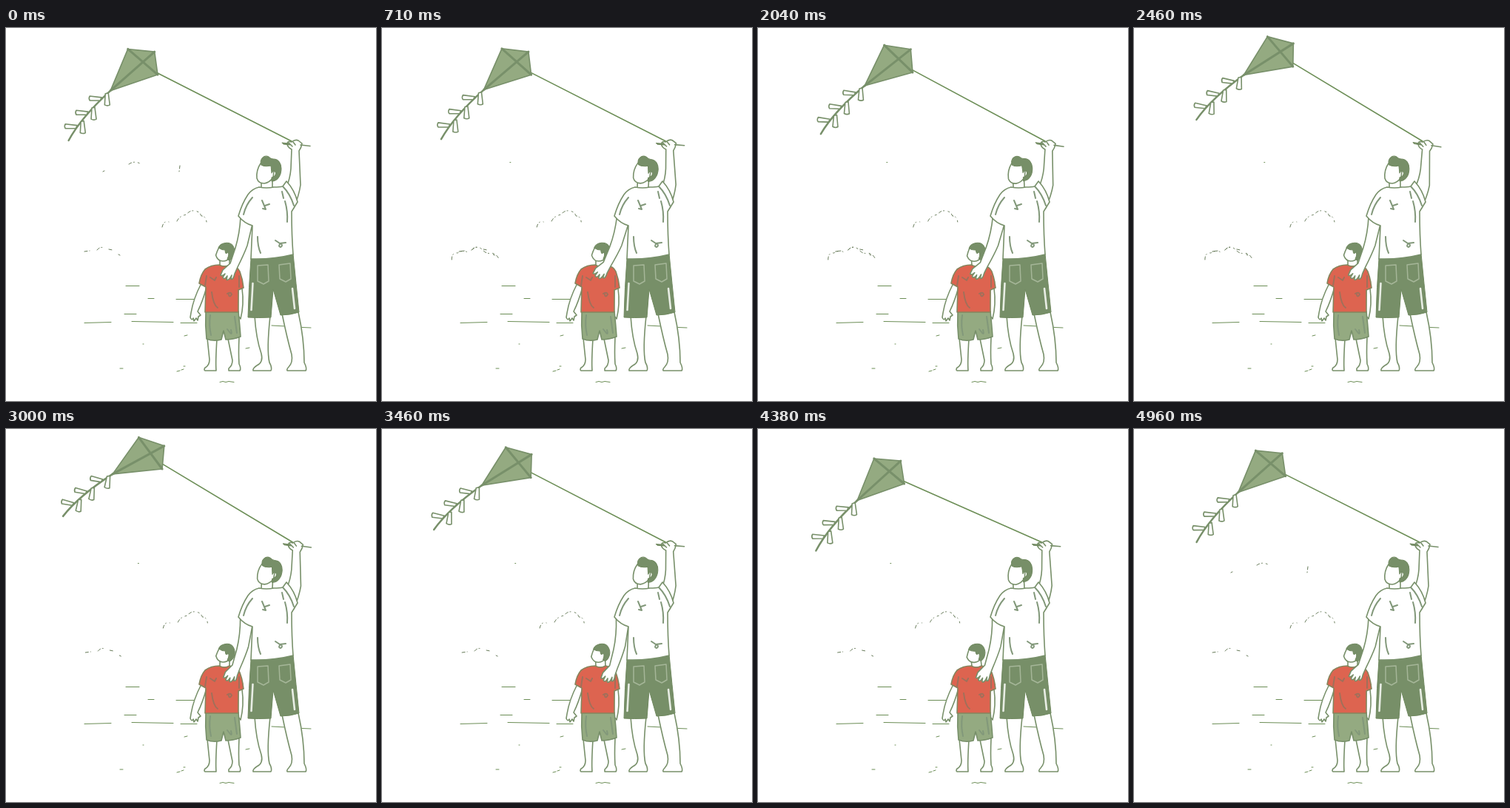
These frames come from a looping animation (500 by 504 pixels, 5000 ms). An HTML page:

```html
<!DOCTYPE html>
<html lang="en">
<head>
<meta charset="utf-8">
<title>Flying a kite</title>
<style>
  html, body { margin: 0; width: 100%; height: 100%; overflow: hidden; background: #fff; }
  svg { display: block; width: 100vw; height: 100vh; }
  path { stroke-linecap: round; stroke-linejoin: round; }
  .skin { fill: #fff; stroke: #78906a; stroke-width: 1.6; }
  .line { fill: none; stroke: #78906a; stroke-width: 1.6; }
  .fold { fill: none; stroke: #82987a; stroke-width: 2; }
  .dark { fill: #778f68; stroke: #70895f; stroke-width: 1; }
  .light { fill: #94aa81; stroke: #78906a; stroke-width: 1.6; }
  .red { fill: #dd6450; stroke: #86855d; stroke-width: 1.6; }
  .redFold { fill: none; stroke: #a0705a; stroke-width: 2; }
  .pocket { fill: none; stroke: #a5b698; stroke-width: 1.5; }
  .stripe { fill: none; stroke: #e8ede4; stroke-width: 2.6; }
  .thin { fill: none; stroke: #6b8d55; stroke-width: 1; }
  .faint { fill: none; stroke: #667a58; stroke-width: 1; stroke-dasharray: 4 3 1 5 2 4; }
</style>
</head>
<body>
<svg viewBox="0 0 500 504" preserveAspectRatio="none">
  <path class="faint" id="wisps" d="M131 194L133 193M166 184Q173 179 181 183M235 186L234 194"/>
  <path class="thin" id="speck" d="M172 181.5h1"/>
  <g id="clouds">
    <path class="faint" d="M211 269Q213 260 220 262M231 261Q234 254 244 252Q248 246 255 247Q262 248 264 254Q270 254 271 262"/>
    <path class="faint" d="M106 302L113 301M123 300Q127 295 132 297M139 299L144 300M152 306L154 307"/>
    <path class="faint" id="cloudEdge" d="M96 313Q96 303 104 304Q112 299 117 303M123 300Q130 292 138 300Q143 306 150 304Q158 306 160 313"/>
  </g>
  <path class="thin" d="M162 348.5H180M230 366.5H257M192 365.5H200M160 386.5H176M106 398.5L142 397.5M170 396.5L226 397.5M236 398.5H258M359 402L378 403M400 404.5L412 405"/>
  <path class="thin" d="M289 478.5l4 -1 4 1 4 -1 7 1M324 433l5 -1M154 460h4M185 427h1M231 464l4 -1M237 462l3 -1M240 457h2M241 416l4 -1"/>

  <path class="thin" id="string" style="stroke-width:1.5"/>
  <g id="kite">
    <g id="tail"><path class="line" style="stroke-width:2.5" d="M-64 21Q-104 57 -121 88"/></g>
    <path class="light" d="M-40 -35L-4 -31L0 0L-64 21Z"/>
    <path class="line" style="stroke-width:3" d="M-40 -35L0 0M-64 21L-4 -31"/>
  </g>

  <g id="raisedArm">
    <path class="skin" d="M379 215Q384 203 385 190L386 164Q380 161 380 156Q381 152 386 154Q391 150 395 152L400 156Q399 162 396 166L398 212Q396 226 389 243Z"/>
    <path class="dark" d="M373 155L382 156L384 158L375 157Z"/>
    <path class="line" d="M398 158L411 159.5M382 155L387 160M388 154L391 158"/>
  </g>

  <g id="child">
    <path class="skin" d="M264 345Q253 366 250 385L249 391Q251 396 253 392L254 396L257 392L259 395L260 390L263 388L259 383Q266 369 271 350ZM314 350L319 352Q322 373 317 393L313 388Z"/>
    <path class="skin" d="M272 419L275 448Q275 456 269 459Q267 462 269 463H284Q283 452 285 420ZM300 420L306 449Q306 456 301 460L301 463H316Q318 460 315 454Q314 440 315 418Z"/>
    <path class="light" d="M270 383H314Q316 402 317 417Q307 421 297 421L294 409L291 421Q280 424 271 420Q269 402 270 383Z"/>
    <path class="fold" d="M276 388Q274 402 277 415M309 390L312 412M299 407l4 5q3 3 1 -4"/>
    <g id="childHead">
      <path class="skin" d="M289 312V322H302V310Z"/>
      <path class="skin" d="M288 296Q285 302 283.5 307Q286 315 293 315Q299 315 303 310V296Z"/>
      <path class="dark" d="M287 297C290 289 303 288 307 295C311 302 308 311 302 314L299 312Q302 306 300 303Q296 307 296 300Q291 300 287 297Z"/>
    </g>
    <path class="red" d="M288 320Q295 324 302 320Q313 322 316 329Q320 340 321 351L314 354V384H269L270 350L261 345Q263 333 269 326Q277 320 288 320Z"/>
    <path class="redFold" d="M271 335L269 348M315 335V350M278 357Q280 374 286 378M276 337l6 4 2 -4M299 359q5 -3 6 1q-3 5 -4 0"/>
  </g>

  <path class="skin" d="M336 389Q338 420 345 440Q348 452 339 456Q333 460 334 463H358Q360 459 356 452Q352 435 357 389ZM373 386Q380 420 386 441Q388 452 382 458Q379 461 380 463H405Q407 460 403 452Q403 420 395 384Z"/>
  <path class="dark" d="M331 312Q360 312 388 305Q392 346 396 384Q384 388 371 388L361 353L358 391Q341 392 327 391Q328 350 331 312Z"/>
  <path class="pocket" d="M340 321L354 320L355 342L348 346L340 342ZM369 320L384 318L385 339L378 343L370 339Z"/>
  <path class="stripe" d="M333.5 345L331.5 381M387 352L390 379"/>

  <path class="skin" id="loweredArm" d="M317 255Q316 277 310 297L303 318L293 327L290 334Q292 336 296 332L293 337Q295 341 299 335L298 340Q301 342 305 334L304 339Q307 341 309 332L313 323Q322 305 326 294L333 265Z"/>
  <g id="fatherHead">
    <path class="skin" d="M345 203V218H360V202Z"/>
    <path class="skin" d="M344 183Q338 192 339 203Q341 210 349 210Q356 209 361 202L363 185Z"/>
    <path class="dark" d="M345 185C342 177 349 171 355 174Q358 177 361 177C369 177 372 184 372 190C372 199 367 207 359 207L359 202C366 200 366 193 361 193L359 196L358 186Q350 188 345 185Z"/>
  </g>
  <path class="skin" d="M342 215Q352 217 362 215Q370 215 374 214L379 207Q390 219 394 235L386 248Q386 280 388 306Q360 313 331 312L333 267Q322 264 314 254Q319 237 327 225Q333 217 342 215Z"/>
  <path class="fold" d="M333 229Q324 239 321 252M373 221L375 230M377 234Q381 248 380 262M340 282Q340 295 344 304M374 214Q384 224 389 240M346 233L351 245L347 244M350 240L356 238M364 287L370 291L378 290M371 291q-4 4 0 5q4 -2 0 -5"/>
</svg>

<script>
const LOOP = 5000;
const $ = id => document.getElementById(id);
const place = (id, transform) => $(id).setAttribute('transform', transform);
const show = (id, visible) => $(id).setAttribute('visibility', visible ? 'visible' : 'hidden');

// Periodic motion: a slow swing plus one at twice its rate
const wave = (phase, mean, cos1, sin1, cos2, sin2) => mean
  + cos1 * Math.cos(phase) + sin1 * Math.sin(phase)
  + cos2 * Math.cos(2 * phase) + sin2 * Math.sin(2 * phase);

// A pair of ribbons at each knot, evenly spaced along the tail curve
for (let i = 0; i < 3; i++) {
  const u = 0.157 + 0.277 * i;
  const x = -64 - 80 * u + 23 * u * u, y = 21 + 72 * u - 5 * u * u;
  $('tail').insertAdjacentHTML('beforeend',
    `<path class="skin" transform="translate(${x} ${y})" d="M0 -2L-16 -4Q-18 -1 -16 2L-2 2ZM5 -7L4 8Q8 10 11 8L9 -8Z"/>`);
}

function draw(t) {
  const phase = 2 * Math.PI * t / LOOP;
  const sway = Math.sin(phase);
  const x = wave(phase, 203.6, -5, 0.75, 6.4, 2);
  const y = wave(phase, 64.1, 5.7, -1.75, -6.7, -4.7);
  const tilt = wave(phase, 3, -4.7, -3.3, 1.2, 3.35);
  const hand = wave(phase, -0.9, -2, 0.3, 2.9, 0);

  // The string runs to a point behind the middle of the kite
  const a = tilt * Math.PI / 180, c = Math.cos(a), s = Math.sin(a);
  const [ax, ay] = [-23, -14];
  $('string').setAttribute('d',
    `M${x + ax * c - ay * s} ${y + ax * s + ay * c}L${386 + hand} 153`);

  place('kite', `translate(${x} ${y}) rotate(${tilt})`);
  place('tail', `rotate(${-0.25 * tilt} -64 21)`);
  place('raisedArm', `rotate(${hand / 1.48} 385 240)`);
  place('loweredArm', `rotate(${5 * sway} 325 262)`);
  place('fatherHead', `rotate(${3 * Math.sin(2 * phase)} 352 215)`);
  place('childHead', `rotate(${4.5 * Math.sin(2 * phase + Math.PI / 4) - 3} 296 320)`);
  place('clouds', `translate(${-2.3 * sway} 0)`);
  place('speck', `translate(${4 - 4 * sway} 0)`);

  const nearStart = t < 300 || t > 4800;
  show('wisps', nearStart);
  show('speck', !nearStart);
  show('cloudEdge', t > 400 && t < 2700);
}

function tick() {
  draw(performance.now() % LOOP);
  requestAnimationFrame(tick);
}
tick();
</script>
</body>
</html>
```
